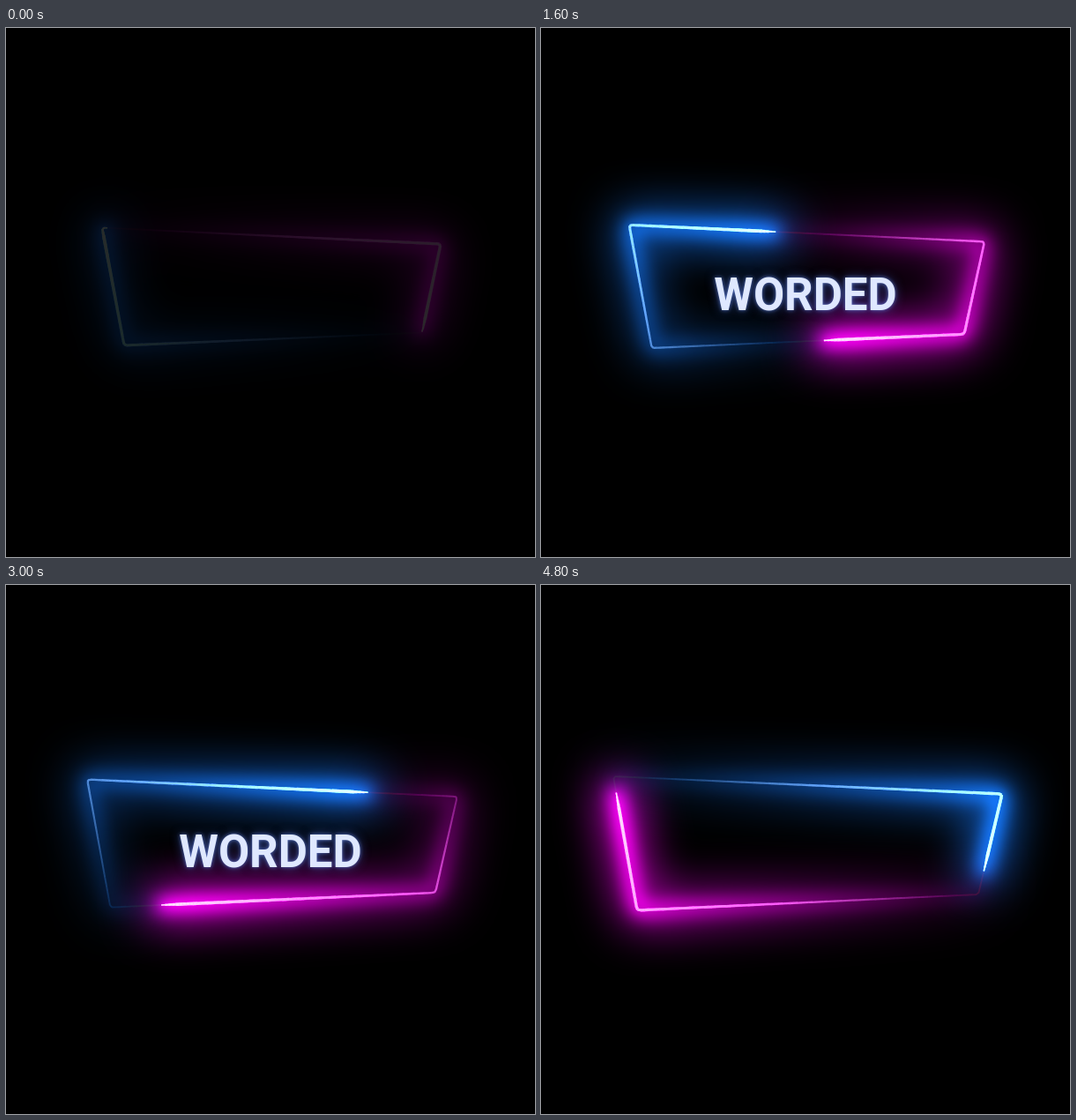
An HTML page with a canvas that plays this animation: 600x600 px, repeating every 4900 ms.

```html
<!DOCTYPE html>
<html lang="en">
<head>
<meta charset="utf-8">
<title>Neon sign</title>
<style>
  html, body { margin: 0; width: 100%; height: 100%; overflow: hidden; background: #000; }
  canvas { position: absolute; left: 0; top: 0; width: 600px; height: 600px; }
  #word {
    position: absolute; left: 0; top: 273px; width: 600px; height: 60px;
    font: bold 51px/60px Roboto, "Open Sans", sans-serif;
    text-align: center; color: #dfe8ff; opacity: 0;
    text-shadow: 0 0 4px rgba(120, 155, 255, .6), 0 0 12px rgba(70, 110, 220, .55);
  }
</style>
</head>
<body>
<canvas id="stage" width="600" height="600"></canvas>
<div id="word">WORDED</div>
<script>
const LOOP = 4900, STEP = 100, SLICES = 130;
const word = document.getElementById('word');
const stage = document.getElementById('stage');
const ctx = stage.getContext('2d');
const layer = document.createElement('canvas');
layer.width = layer.height = 600;
const pen = layer.getContext('2d');

// Corners clockwise from top left: position at 0 ms and drift until 4800 ms
const corners = [
  [109, 226.5, -27, -9.5],
  [493, 245, 30, -8],
  [472, 345.5, 24, 5.5],
  [134, 360, -25, 9]
];
const blue = { glow: [20, 112, 235], core: [215, 235, 255] };
const pink = { glow: [240, 0, 235], core: [255, 230, 255] };

const clamp = v => Math.max(0, Math.min(1, v));
const ramp = (t, from, to) => clamp((t - from) / (to - from));
const rgb = (c, k) => `rgb(${c.map(v => Math.round(v * k)).join()})`;

// Returns a function from path fraction to a point on the frame
function makeFrame(t) {
  const pts = corners.map(([x, y, dx, dy]) => [x + dx * t / 4800, y + dy * t / 4800]);
  const sides = pts.map((a, i) => {
    const b = pts[(i + 1) % 4];
    return { a, b, len: Math.hypot(b[0] - a[0], b[1] - a[1]) };
  });
  const total = sides.reduce((sum, s) => sum + s.len, 0);
  const raw = d => {
    d = (d % total + total) % total;
    for (const { a, b, len } of sides) {
      if (d <= len) return [0, 1].map(i => a[i] + (b[i] - a[i]) * d / len);
      d -= len;
    }
    return pts[0];
  };
  // Averaging neighbours rounds the corners
  return f => {
    const near = [-2, -0.7, 0.7, 2].map(o => raw(f * total + o));
    return [0, 1].map(i => near.reduce((sum, p) => sum + p[i], 0) / 4);
  };
}

// Light properties at u: 0 is the head, 1 the end of the tail
const tip = u => clamp(u / 0.035);
const glowAt = u => 0.04 + 0.96 * (1 - u);
const lineAt = u => 0.2 + 0.8 * Math.pow(1 - u, 0.8);
const coreAt = u => clamp(1 - u / 0.9);

function addLayer(at, head, mode, color, light, width, blur, cap) {
  pen.clearRect(0, 0, 600, 600);
  pen.lineCap = cap;
  const span = 0.5 / SLICES;
  for (let i = SLICES - 1; i >= 0; i--) {
    const u = (i + 0.5) / SLICES, from = head - i * span;
    pen.beginPath();
    pen.moveTo(...at(from));
    pen.lineTo(...at(from - span * 1.1));
    pen.lineWidth = width(u);
    pen.strokeStyle = rgb(color, light(u));
    pen.stroke();
  }
  ctx.globalCompositeOperation = mode;
  ctx.filter = `blur(${blur}px)`;
  ctx.drawImage(layer, 0, 0);
}

function drawGlow(at, head, { glow }) {
  addLayer(at, head, 'lighter', glow, glowAt, () => 34, 26, 'round');
  addLayer(at, head, 'lighter', glow, glowAt, () => 14, 10, 'round');
}

function drawLine(at, head, { glow, core }) {
  addLayer(at, head, 'lighten', glow, glowAt, u => 2 + 4 * tip(u), 3, 'round');
  addLayer(at, head, 'lighten', glow, lineAt, u => 1.4 + (0.3 + 2.3 * (1 - u)) * tip(u), 0.6, 'butt');
  addLayer(at, head, 'lighter', core, coreAt, u => 1.3 + 2.5 * (1 - u) * tip(u), 0.6, 'butt');
}

function draw(t) {
  const at = makeFrame(t), head = 0.00625 + 0.0000993 * t;
  const beams = [[at, head, blue], [at, head + 0.5, pink]];
  ctx.globalCompositeOperation = 'source-over';
  ctx.filter = 'none';
  ctx.fillStyle = '#000';
  ctx.fillRect(0, 0, 600, 600);
  beams.forEach(b => drawGlow(...b));
  beams.forEach(b => drawLine(...b));
  stage.style.opacity = ramp(t, -100, 500);
  word.style.opacity = ramp(t, 100, 700) * (1 - ramp(t, 4000, 4600));
}

const start = performance.now();
let shown = -1;
function tick() {
  const t = Math.floor((performance.now() - start) % LOOP / STEP) * STEP;
  if (t !== shown) draw(shown = t);
  requestAnimationFrame(tick);
}
tick();
</script>
</body>
</html>
```
